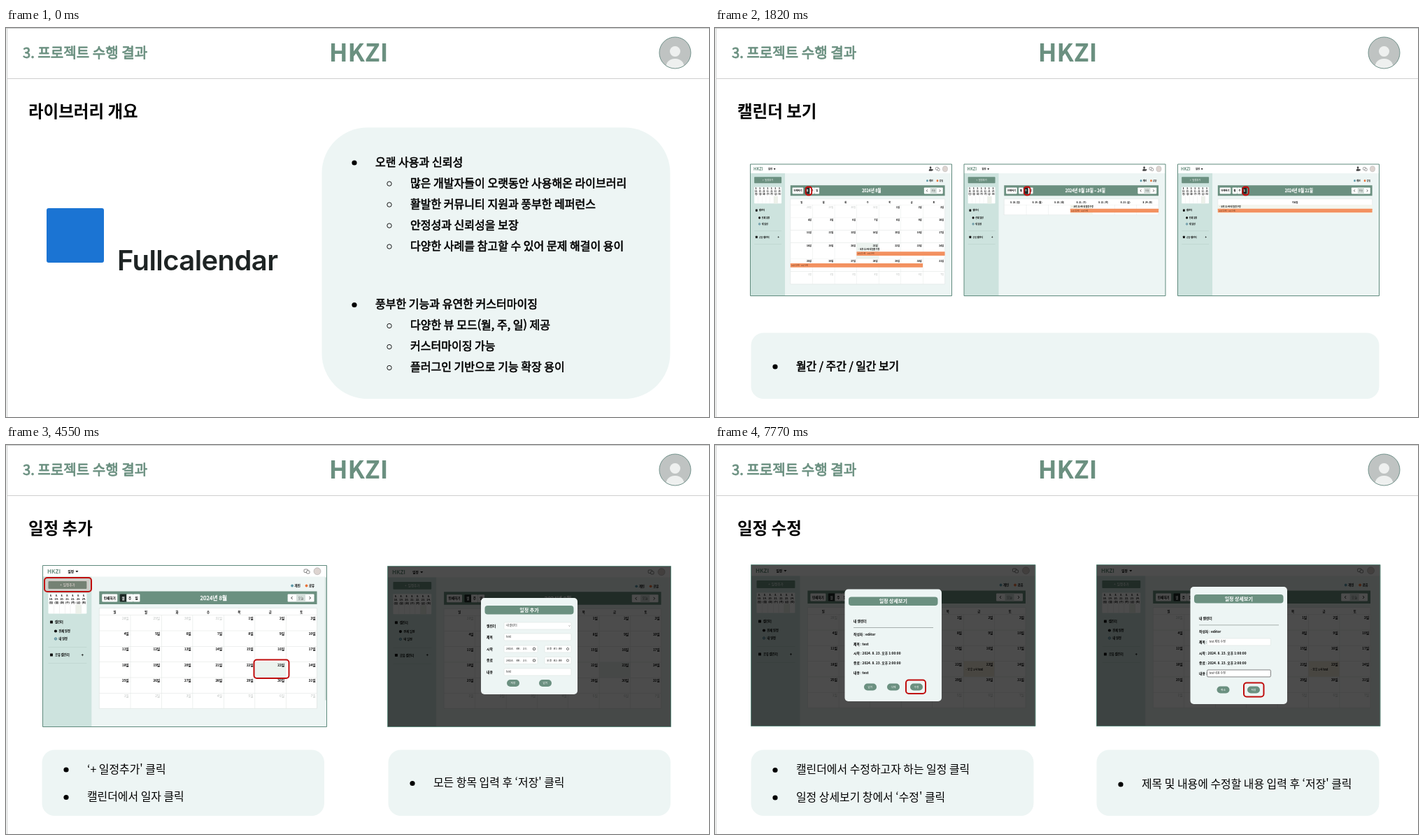
These frames come from a looping animation (1005x557 px, 8000 ms). An HTML page with a canvas:

```html
<!DOCTYPE html>
<html lang="ko">
<head>
<meta charset="utf-8">
<style>
html, body { margin: 0; width: 100%; height: 100%; overflow: hidden; background: #fff; }
canvas { display: block; }
</style>
</head>
<body>
<canvas id="stage" width="1005" height="557"></canvas>
<script>
const ctx = document.getElementById('stage').getContext('2d');
const LOOP = 8000;
const BRAND = 'HKZI';
const GREEN = '#6b9080', MINT = '#edf5f4', SIDE = '#cde3de', RED = '#c00d0d', ORANGE = '#f39160';
const DAYS = [...'일월화수목금토'];
const SANS = '"Noto Sans CJK KR", "Noto Sans CJK", sans-serif';
const MONO = '"Noto Sans Mono", monospace';

// Text is placed by the vertical centre of its Hangul glyphs.
function text(s, x, y, size, { color = '#000', weight = 400, align = 'left', font = SANS } = {}) {
  ctx.font = `${weight} ${size}px ${font}`;
  ctx.fillStyle = ctx.strokeStyle = color;
  ctx.textAlign = align;
  ctx.fillText(s, x, y + size * 0.37);
  if (weight === 500) { // medium: regular glyphs, slightly thickened
    ctx.lineWidth = size * 0.04;
    ctx.lineJoin = 'round';
    ctx.strokeText(s, x, y + size * 0.37);
  }
}
function box(x, y, w, h, fill, r = 0, stroke, line = 1) {
  ctx.beginPath();
  ctx.roundRect(x, y, w, h, r);
  if (fill) { ctx.fillStyle = fill; ctx.fill(); }
  if (stroke) { ctx.strokeStyle = stroke; ctx.lineWidth = line; ctx.stroke(); }
}
function dot(x, y, r, fill, stroke, line = 1) {
  box(x - r, y - r, 2 * r, 2 * r, fill, r, stroke, line);
}
const redBox = (x, y, w, h) => box(x, y, w, h, null, 4, RED, 2);

function chevron(x, y, dir) {
  ctx.beginPath();
  ctx.moveTo(x - dir, y - 2);
  ctx.lineTo(x + dir, y);
  ctx.lineTo(x - dir, y + 2);
  ctx.strokeStyle = '#222';
  ctx.lineWidth = 0.9;
  ctx.stroke();
}

function sidebar() {
  box(0, 16, 70, 215, SIDE);
  box(8, 22.5, 55, 11, GREEN, 1);
  text('+  일정추가', 35.5, 28, 4.6, { color: '#fff', align: 'center' });
  box(8, 40, 55, 29, '#fff', 1);
  box(47.5, 56, 7.8, 13, '#edf1ea');
  DAYS.forEach((day, i) => {
    const x = 12 + i * 7.85;
    ['8.', 18 + i + '.', `(${day})`].forEach((s, j) =>
      text(s, x, 43 + j * 5, 3.6, { weight: 700, align: 'center' }));
    if (i) box(x - 4, 56, 0.4, 13, '#ddd');
  });
  box(10.5, 79, 4, 4, '#111', 0.5);
  text('캘린더', 17.5, 81, 4.3, { weight: 500 });
  dot(18.5, 94, 2.1, '#111');
  text('전체 일정', 23, 94, 4.2, { weight: 500 });
  dot(18.5, 105, 1.7, '#8ab5c0', '#47798a', 0.8);
  text('내 일정', 23, 105, 4.2, { weight: 500 });
  box(8, 117, 55, 0.5, '#b5cec7');
  box(10.5, 126, 4, 4, '#111', 0.5);
  text('공유 캘린더', 17.5, 128, 4.3, { weight: 500 });
  text('+', 57, 128, 6, { weight: 700, align: 'center' });
  box(8, 140, 55, 0.5, '#b5cec7');
}

function topBar(person) {
  box(0, 0, 407, 16, '#fff');
  text(BRAND, 6.5, 8.5, 8, { color: GREEN, weight: 700 });
  text('일정', 36, 8.7, 4.6, { weight: 500 });
  ctx.fillStyle = '#111';
  ctx.beginPath();
  ctx.moveTo(47, 7.5); ctx.lineTo(51, 7.5); ctx.lineTo(49, 10);
  ctx.fill();
  if (person) {
    dot(364, 6, 1.9, '#444');
    box(360.8, 8.4, 6.5, 3.6, '#444', [2, 2, 0, 0]);
    dot(368, 10, 1.3, '#444');
  }
  box(374.5, 5.5, 5.5, 4.5, '#fff', 1, '#555', 0.7);
  box(378, 7.5, 4.5, 4, '#fff', 1, '#555', 0.7);
  dot(393.5, 8.3, 5, '#ddd4d0', '#999', 0.5);
  dot(357.5, 29, 1.9, '#5b98a8');
  text('개인', 361, 29, 4.4, { weight: 500 });
  dot(378, 29, 1.9, '#e8743b');
  text('공유', 381.5, 29, 4.4, { weight: 500 });
}

function toolbar(title, view) {
  box(81, 37, 312, 18.5, GREEN);
  box(85, 41, 22, 11, '#fff', 1);
  text('인쇄하기', 96, 46.5, 4.6, { align: 'center', weight: 500 });
  ['월', '주', '일'].forEach((s, i) => {
    const on = i === view;
    box(110.5 + i * 9.6, 41, 9.6, 11, on ? '#1d2825' : '#fff', 1);
    text(s, 115.3 + i * 9.6, 46.5, 4.6, { align: 'center', color: on ? '#fff' : '#000', weight: 500 });
  });
  text(title, 245, 46.5, 8, { color: '#fff', weight: 500, align: 'center' });
  box(351, 41, 38, 11, '#fff', 1);
  box(363.5, 41, 13, 11, '#d5dfdb');
  chevron(357, 46.5, -1);
  chevron(383, 46.5, 1);
  text('오늘', 370, 46.5, 4.4, { align: 'center', color: '#555' });
}

const COL = 312 / 7;

function event(x, y, w) {
  text('· 오후 11:40 내 일정 수정', x + 3, y - 4, 4, { weight: 700 });
  bar(x, y, w);
}
function bar(x, y, w) {
  box(x, y, w, 7, ORANGE, 0.6);
  text('오후 11:40 · 오후 5:40', x + 2, y + 3.5, 3.5, { color: '#5b3018' });
}

function month({ rows = Array(6).fill(22.3), events, mark, label }) {
  const height = rows.reduce((a, b) => a + b, 10);
  box(81, 61, 312, height, '#fff', 0, '#d9dfdd', 0.6);
  DAYS.forEach((d, i) => text(d, 81 + COL * (i + 0.5), 66.5, 4.4, { weight: 700, align: 'center' }));
  let y = 71;
  rows.forEach((h, r) => {
    box(81, y, 312, 0.5, '#dde2e0');
    for (let c = 0; c < 7; c++) {
      const n = r * 7 + c - 3, x = 81 + c * COL;
      if (n === mark) {
        box(x, y, COL, h, label ? '#f3ecdb' : '#ecf3ef');
        if (label) text('· 오후 1시 test', x + 3, y + 12, 4, { weight: 500 });
      }
      const inside = n > 0 && n < 32;
      text((n < 1 ? n + 31 : n > 31 ? n - 31 : n) + '일', x + COL - 2, y + 4.5, 4.8,
        { align: 'right', color: inside ? '#111' : '#b8bdbb', weight: inside ? 500 : 400 });
    }
    y += h;
  });
  for (let c = 1; c < 7; c++) box(81 + c * COL, 71, 0.5, height - 10, '#dde2e0');
  if (events) {
    event(81 + 3 * COL, 153.5, 4 * COL);
    bar(81, 174, 6 * COL);
  }
}

function agenda(heads) {
  const w = 312 / heads.length, start = heads.length > 1 ? 3 : 0;
  box(81, 61, 312, 28, '#fff', 0, '#d9dfdd', 0.6);
  box(81, 71, 312, 0.5, '#dde2e0');
  heads.forEach((s, i) => {
    text(s, 81 + w * (i + 0.5), 66.5, 4.3, { weight: 700, align: 'center' });
    if (i) box(81 + i * w, 71, 0.5, 18, '#dde2e0');
  });
  box(81 + start * w, 71, w, 18, '#f4f6ee');
  event(81 + start * w, 78, 312 - start * w);
}

// One app screenshot, laid out on 407 x 231 units.
function app(x, y, w, h, { title = '2024년 8월', view = 0, heads, dim, person, scroll, ...grid } = {}) {
  ctx.save();
  ctx.translate(x, y);
  ctx.scale(w / 407, h / 231);
  ctx.beginPath();
  ctx.rect(0, 0, 407, 231);
  ctx.clip();
  box(0, 0, 407, 231, MINT);
  topBar(person);
  sidebar();
  toolbar(title, view);
  heads ? agenda(heads) : month(grid);
  if (scroll) box(405, 17, 1, 176, '#a9c2b9');
  if (person) box(112 + view * 9.6, 40, 12, 14, null, 4, RED, 2.6);
  if (dim) box(0, 0, 407, 231, `rgba(0,0,0,${dim})`);
  ctx.restore();
  box(x, y, w, h, null, 0, '#5f8a7d');
}

function modal(x, y, w, h, title) {
  box(x, y, w, h, MINT, 5);
  box(x + 5.5, y + 11, w - 11, 12.5, GREEN, 4);
  text(title, x + w / 2, y + 17.2, 7, { color: '#fff', weight: 700, align: 'center' });
}
function pill(s, x, y) {
  box(x - 9, y - 5, 18, 10, GREEN, 5);
  text(s, x, y, 3.8, { color: '#fff', align: 'center' });
}
function field(x, y, w, s, font = SANS, stroke = '#dce4e1') {
  box(x, y - 5, w, 10, '#fff', 1.5, stroke, 0.6);
  text(s, x + 3, y, 4, { font, color: '#222' });
}
const label = (s, x, y) => text(s, x, y, 4.8, { weight: 700 });

function panel(x, w, lines) {
  box(x, 436.5, w, 94.5, MINT, 18);
  lines.forEach(([s, y, weight]) => {
    dot(x + 34.5, y + 1, 3.6, '#000');
    text(s, x + 64.5, y, 15.9, { weight });
  });
}

function frame(title) {
  box(0, 0, 1005, 557, '#fff');
  box(0, 0, 1005, 1, '#c9cccb');
  box(1, 0, 1, 557, '#c9cccb');
  box(1, 72, 1004, 1, '#cfcfcf');
  text('3. 프로젝트 수행 결과', 24, 35.5, 20.1, { color: GREEN, weight: 500 });
  text(BRAND, 504, 34.5, 35.5, { color: GREEN, weight: 700, align: 'center' });
  ctx.save();
  dot(956.5, 35.5, 22.5, '#bfc3c2');
  ctx.clip();
  dot(956.5, 33.5, 7.5, '#eef0ef');
  box(943.5, 44, 26, 24, '#eef0ef', 12);
  ctx.restore();
  dot(956.5, 35.5, 22.5, null, '#71918a');
  text(title, 32, 119, 23.5, { weight: 700 });
}

function overview() {
  frame('라이브러리 개요');
  box(58, 258, 82, 78, '#1b74d3', 3);
  ctx.font = '600 40px Inter, sans-serif';
  ctx.letterSpacing = '-0.6px';
  ctx.fillStyle = '#1e2424';
  ctx.textAlign = 'left';
  ctx.fillText('Fullcalendar', 159, 346.5);
  ctx.letterSpacing = '0px';
  box(451.5, 142.5, 498, 388.5, MINT, 65);
  const list = (y, head, items) => {
    dot(498, y + 1, 3.6, '#000');
    text(head, 528, y, 16.05, { weight: 500 });
    items.forEach((s, i) => {
      const row = y + 30 * (i + 1);
      dot(548, row + 1, 3.2, null, '#000', 0.9);
      text(s, 578, row, 16.05, { weight: 500 });
    });
  };
  list(192, '오랜 사용과 신뢰성', ['많은 개발자들이 오랫동안 사용해온 라이브러리',
    '활발한 커뮤니티 지원과 풍부한 레퍼런스', '안정성과 신뢰성을 보장',
    '다양한 사례를 참고할 수 있어 문제 해결이 용이']);
  list(395.5, '풍부한 기능과 유연한 커스터마이징', ['다양한 뷰 모드(월, 주, 일) 제공',
    '커스터마이징 가능', '플러그인 기반으로 기능 확장 용이']);
}

function views() {
  frame('캘린더 보기');
  const shot = (x, opts) => app(x, 195, 288, 188.5, { person: true, ...opts });
  shot(50.5, { events: true, mark: 21, rows: [22.3, 22.3, 22.3, 28, 22.3, 22.3] });
  shot(356, { view: 1, title: '2024년 8월 18일 – 24일', heads: DAYS.map((d, i) => `8. ${18 + i}. (${d})`) });
  shot(661.5, { view: 2, title: '2024년 8월 21일', heads: ['수요일'] });
  panel(51.5, 898, [['월간 / 주간 / 일간 보기', 484, 500]]);
}

function adding() {
  frame('일정 추가');
  app(52.5, 172.5, 406, 231, { mark: 23, scroll: true });
  box(55, 190, 67, 20, 'rgba(192,13,13,.1)', 4);
  redBox(55, 190, 67, 20);
  redBox(354.5, 307.5, 50, 26.5);
  app(545.5, 173.5, 405, 230, { mark: 23, dim: 0.7 });
  modal(679, 219, 138, 138, '일정 추가');
  ['캘린더', '제목', '시작', '종료', '내용'].forEach((s, i) => label(s, 687, 259 + i * 16.5));
  field(712, 259, 96, '내 캘린더');
  ctx.save();
  ctx.translate(805.5, 259);
  ctx.rotate(Math.PI / 2);
  ctx.scale(0.5, 0.5);
  chevron(0, 0, 1);
  ctx.restore();
  field(712, 275, 96, 'test');
  [292, 308.5].forEach((y, i) => {
    field(712, y, 48, '2024. 08. 23.', MONO);
    box(753.5, y - 1.5, 3, 3, null, 0.4, '#222', 0.7);
    field(770, y, 38, `오후 0${i + 1}:00`, MONO);
    dot(803, y, 1.6, null, '#222', 0.6);
  });
  field(712, 325, 96, 'test');
  pill('저장', 725, 341);
  pill('닫기', 771, 341);
  panel(51.5, 403.5, [["‘+ 일정추가' 클릭", 464], ['캘린더에서 일자 클릭', 503.5]]);
  panel(546.5, 403.5, [["모든 항목 입력 후 ‘저장' 클릭", 483.5]]);
}

function details(x, y) {
  label('내 캘린더', x, y);
  box(x, y + 9, 114, 0.7, '#8f9996');
  label('작성자 : editor', x, y + 19);
}

function editing() {
  frame('일정 수정');
  const shot = { mark: 23, label: true, dim: 0.7 };
  app(51.5, 171.5, 406.5, 231, shot);
  modal(185.5, 206.5, 138.5, 160.5, '일정 상세보기');
  details(198, 252);
  ['제목 : test', '시작 : 2024. 8. 23. 오후 1:00:00', '종료 : 2024. 8. 23. 오후 2:00:00', '내용 : test']
    .forEach((s, i) => label(s, 198, 285 + i * 13.6));
  pill('닫기', 222, 346.5);
  pill('삭제', 255, 346.5);
  pill('수정', 288, 346.5);
  redBox(273, 336.5, 28, 19.5);

  app(545.5, 171.5, 405.5, 231, shot);
  modal(679.5, 203, 138.5, 168, '일정 상세보기');
  details(692, 248.5);
  label('제목 :', 692, 282);
  field(703.5, 282, 91, 'test 제목 수정');
  label('시작 : 2024. 8. 23. 오후 1:00:00', 692, 298);
  label('종료 : 2024. 8. 23. 오후 2:00:00', 692, 312);
  label('내용 :', 692, 327);
  field(703.5, 327, 91, 'test 내용 수정', SANS, '#333');
  pill('취소', 726.5, 350.5);
  pill('저장', 770, 350.5);
  redBox(756, 340.5, 28.5, 20);
  panel(51.5, 404, [['캘린더에서 수정하고자 하는 일정 클릭', 464.5], ["일정 상세보기 창에서 ‘수정' 클릭", 504]]);
  panel(545.5, 404, [["제목 및 내용에 수정할 내용 입력 후 ‘저장' 클릭", 485]]);
}

const slides = [[0, overview], [1680, views], [4480, adding], [7700, editing]];
const start = performance.now();
let shown;
function tick() {
  const t = (performance.now() - start) % LOOP;
  const slide = slides.findLast(([from]) => t >= from)[1];
  if (slide !== shown) (shown = slide)();
  requestAnimationFrame(tick);
}
tick();
</script>
</body>
</html>
```
